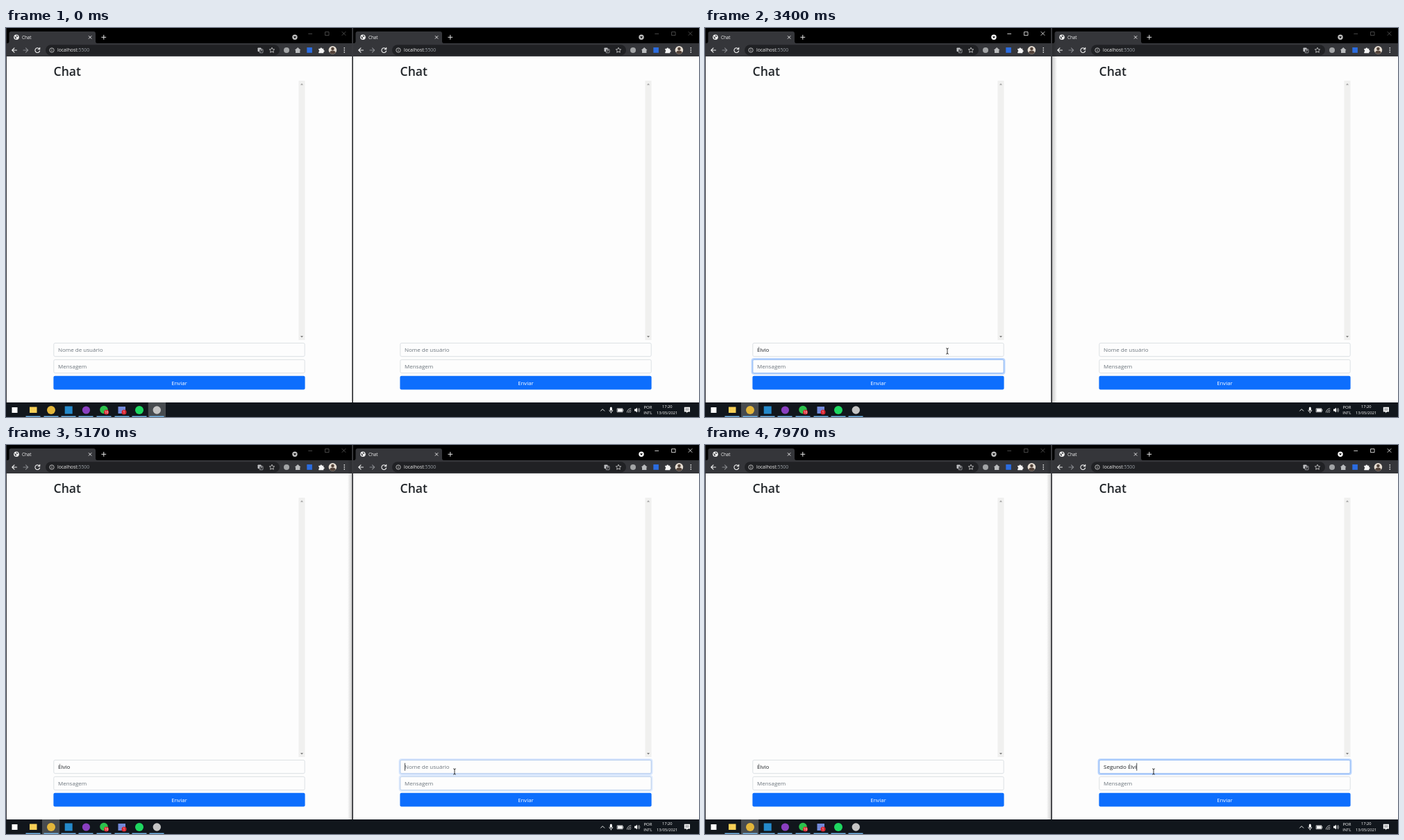
These frames come from a looping animation (998 by 561 pixels, 8 s). An HTML page:

```html
<!DOCTYPE html>
<html lang="pt-BR">
<head>
<meta charset="utf-8">
<title>Chat</title>
<style>
  html, body { margin: 0; width: 100%; height: 100%; overflow: hidden; background: #fdfdfd; }
  svg { display: block; width: 100vw; height: 100vh; }
  text { font-family: "Open Sans", "Noto Sans", sans-serif; white-space: pre; }
  .line { fill: none; stroke-linecap: round; stroke-linejoin: round; }
</style>
</head>
<body>
<svg id="stage" viewBox="0 0 998 561" preserveAspectRatio="none"></svg>
<script>
const LOOP = 8000, FADE = 150, BLINK = 500;
const stage = document.getElementById('stage');
const $ = id => document.getElementById(id);

const rect = (x, y, w, h, fill, extra = '') =>
  `<rect x="${x}" y="${y}" width="${w}" height="${h}" fill="${fill}" ${extra}/>`;
const circle = (x, y, r, fill, extra = '') =>
  `<circle cx="${x}" cy="${y}" r="${r}" fill="${fill}" ${extra}/>`;
const line = (d, color, width = 1, extra = '') =>
  `<path class="line" d="${d}" stroke="${color}" stroke-width="${width}" ${extra}/>`;
const shape = (d, fill, extra = '') => `<path d="${d}" fill="${fill}" ${extra}/>`;
const text = (x, y, size, fill, str, extra = '') =>
  `<text x="${x}" y="${y}" font-size="${size}" fill="${fill}" ${extra}>${str}</text>`;
const middle = 'text-anchor="middle"';

// A text field with placeholder, typed value, caret and fading focus ring
function field(id, y, placeholder) {
  return rect(68.8, y, 361.4, 19.3, '#fdfdfd', 'rx="2" stroke="#ced4da" stroke-width=".7"') +
    `<g id="${id}-focus">` +
    rect(67.6, y - 1.2, 363.8, 21.7, 'none', 'rx="3" stroke="#0d6efd" stroke-opacity=".28" stroke-width="2"') +
    rect(68.8, y, 361.4, 19.3, 'none', 'rx="2" stroke="#86b7fe" stroke-width=".8"') + '</g>' +
    text(75, y + 12.6, 8, '#6c757d', placeholder, `id="${id}-hint"`) +
    text(75, y + 12.6, 8, '#212529', '', `id="${id}-value"`) +
    rect(75, y + 4.3, .8, 11, '#212529', `id="${id}-caret"`);
}

function toolbar() {
  return rect(0, 22, 499, 19, '#35363a') +
    line('M15.5 32H9M12 28.8 8.8 32 12 35.2', '#f1f1f1', 1.1) +
    line('M25 32h6.5M28.5 28.8 31.7 32 28.5 35.2', '#85878b', 1.1) +
    line('M47.6 29.6A3.4 3.4 0 1 0 48.6 33M48.7 28.3V30.7H46.2', '#f1f1f1', 1.1) +
    rect(57, 24.2, 337, 15.4, '#202124', 'rx="7.7"') +
    circle(66, 32, 3.2, 'none', 'stroke="#d8d8d8" stroke-width=".8"') +
    line('M66 31.8v1.6M66 30.2v.1', '#d8d8d8', .8) +
    text(74, 34.4, 6.85, '#f1f1f1', 'localhost<tspan fill="#9aa0a6">:5500</tspan>') +
    rect(362.5, 28.5, 5, 5.5, '#bfc1c4', 'rx=".7"') +
    rect(365, 30.5, 5, 5.3, '#202124', 'rx=".7" stroke="#bfc1c4" stroke-width=".7"') +
    line('M366.3 32h2.4M367.5 31.5v.5M366.5 34.5l2-2.4', '#bfc1c4', .6) +
    shape('M383 28.2l1.1 2.4 2.6.3-1.9 1.8.5 2.6-2.3-1.3-2.3 1.3.5-2.6-1.9-1.8 2.6-.3z', 'none',
      'stroke="#d8d8d8" stroke-width=".8"') +
    circle(404, 32, 4, '#a2a4a6') +
    shape('M415.8 32l4.4-4 4.4 4h-1.2v4h-6.4v-4z', '#b9bbbd') +
    rect(433.3, 28, 7.6, 7.8, '#2b6ce0') +
    shape('M450.3 29.7h2.2a1.3 1.3 0 0 1 2.6 0h2.2v2.2a1.3 1.3 0 0 1 0 2.6v1.8h-7v-2a1.3 1.3 0 0 0 0-2.5z', '#f4f4f4') +
    circle(470.4, 31.8, 5.8, '#e6ddd2') +
    circle(470.4, 30, 2.3, '#54443b') + shape('M466 35.5a4.5 3.8 0 0 1 8.8 0 5.8 5.8 0 0 1-8.8 0z', '#54443b') +
    [28.8, 31.8, 34.8].map(y => circle(487.3, y, .85, '#f1f1f1')).join('');
}

function browser(id, x) {
  return `<g transform="translate(${x})">` +
    rect(0, 0, 499, 540, '#fdfdfd') + rect(0, 0, 499, 22, '#000') +
    shape('M2 22Q4.5 22 4.5 19V8Q4.5 5 7.5 5H126Q129 5 129 8V19Q129 22 131.5 22Z', '#35363a') +
    circle(15, 13.3, 3.8, '#f1f1f1') +
    shape('M12 12l2.6 1 .3 2.4-1.2.6zM15 10.2l2.6 1.6-1.4 1.3-1.4-.8z', '#45464a') +
    text(23, 15.6, 6.3, '#f1f1f1', 'Chat') +
    line('M119.2 11.5l3.8 3.8M123 11.5l-3.8 3.8', '#f1f1f1', .9) +
    line('M137.8 13.3h6M140.8 10.3v6', '#e8e8e8', 1) +
    circle(416, 13.3, 3.7, '#eee', `id="${id}-badge"`) + shape('M414 12.3h4l-2 2.6z', '#000') +
    `<g id="${id}-controls" stroke="#fff">` +
    '<path class="line" stroke-width=".8" d="M435.7 8.4h5M460 5.7h5v5h-5zM484 5.5l5 5M489 5.5l-5 5"/></g>' +
    toolbar() +
    text(68.5, 68.7, 17.6, '#212529', 'Chat', 'font-weight="600"') +
    rect(421.5, 76, 9, 374, '#f0f0ef') +
    shape('M424 82.2h4l-2-2.4z', '#a3a3a3') + shape('M424 444h4l-2 2.4z', '#808080') +
    field(id + '-name', 454.4, 'Nome de usuário') +
    field(id + '-message', 478.3, 'Mensagem') +
    rect(68.4, 501.7, 362.2, 19.8, '#0d6efd', 'rx="2.1"') +
    `<g id="${id}-send-focus">` +
    rect(68.4, 501.7, 362.2, 19.8, '#0b5ed7', 'rx="2.1"') +
    rect(67.4, 500.7, 364.2, 21.8, 'none', 'rx="3" stroke="#3184fd" stroke-opacity=".5" stroke-width="2"') + '</g>' +
    text(249.5, 514.6, 7.8, '#fff', 'Enviar', middle) +
    rect(0, 0, 1, 540, '#33343a') + '</g>';
}

function taskbar() {
  const running = [39, 65, 90, 115, 141, 167, 192, 217];
  const badge = (x, label) => circle(x, 554, 3.5, '#d9232e') + text(x, 556, 5, '#fff', label, middle);
  return rect(0, 540, 998, 21, '#11161c') +
    rect(204.8, 540, 25.2, 21, '#474b4f', 'id="recorder-active"') +
    rect(52, 540, 25.2, 21, '#474b4f', 'id="browser-active"') +
    running.map(x => rect(x - 10.5, 559.6, 21, 1.4, '#76b9ed')).join('') +
    rect(8.5, 547, 8, 8, '#fff') + rect(34, 546.5, 10.5, 8.5, '#f8cf57') +
    circle(65, 551, 6, '#e2b53a') + rect(84.7, 545.5, 11, 11, '#2489ca') +
    circle(115.4, 551, 5.6, '#8a3fc0') + circle(141, 550.5, 5.8, '#2cc14c') + badge(144.5, '16') +
    rect(161.5, 546, 10.5, 10, '#7289da') + badge(170, '1') +
    circle(192, 551, 6, '#1ed760') + circle(217.3, 551, 5.7, '#c4c4c4') +
    line('M856.6 552.2l2.6-2.6 2.6 2.6', '#fff', .9) +
    rect(869.8, 546.5, 3, 5.5, '#fff', 'rx="1.5"') + line('M868.8 551.2a2.5 2.5 0 0 0 5 0M871.3 553.7v1.5', '#fff', .8) +
    rect(881, 549.3, 6.5, 4, '#fff') + line('M880.5 548.8h7.5v5h-7.5zM888.7 550.4v1.8', '#fff', .7) +
    line('M894.4 554.2a5.5 5.5 0 0 1 5.5-5.5M896.4 554.5a3.5 3.5 0 0 1 3.5-3.5M898.5 554.5a1.4 1.4 0 0 1 1.4-1.4', '#ddd', .8) +
    shape('M905 549.6h1.7l2.2-2v7l-2.2-2H905z', '#fff') +
    line('M910.3 549.6q1.1 1.5 0 3M911.7 548.3q2.1 2.8 0 5.6', '#fff', .7) +
    text(924.4, 548.6, 6, '#fff', 'POR', middle) + text(924.4, 557.2, 5.8, '#fff', 'INTL', middle) +
    text(952.2, 548.3, 5.7, '#fff', '17:20', middle) + text(952.2, 557.2, 5.7, '#fff', '13/05/2021', middle) +
    shape('M976.8 546.8h8.2v6.6h-3.2l-1.7 2v-2h-3.3z', '#fff') +
    line('M978.5 549h4.8M978.5 551h4.8', '#11161c', .6);
}

const pointers = {
  beam: line('M-1.4-4.2Q0-4.2 0-3V3Q0 4.2-1.4 4.2M1.4-4.2Q0-4.2 0-3M0 3Q0 4.2 1.4 4.2', '#222', .9),
  resize: line('M-5 0H5M-3-2-5.2 0-3 2M3-2 5.2 0 3 2M-.6-2.2v4.4M.6-2.2v4.4', '#333', .8),
  arrow: shape('M0 0V9.2L2.2 7.2 3.7 10.5 5.2 9.8 3.7 6.6H6.6Z', '#fff', 'stroke="#000" stroke-width=".6"')
};

stage.innerHTML =
  `<defs><linearGradient id="shade"><stop stop-color="#000" stop-opacity=".2"/>
   <stop offset="1" stop-color="#000" stop-opacity="0"/></linearGradient></defs>` +
  browser('left', 0) + browser('right', 499) +
  rect(500, 0, 7, 540, 'url(#shade)', 'id="left-shadow"') +
  rect(-499, 0, 7, 540, 'url(#shade)', 'id="right-shadow" transform="scale(-1 1)"') +
  rect(498.2, 0, 1.6, 540, '#3b3c40') + taskbar() +
  Object.entries(pointers).map(([name, art]) => `<g id="${name}">${art}</g>`).join('');

// Focus spans [from, to] and key press times, in ms
const windows = { left: [750, 4550], right: [4550, Infinity] };
const inputs = [
  { id: 'left-name', span: [750, 2670], value: 'Élvio', keys: [1900, 2080, 2230, 2380, 2510] },
  { id: 'left-message', span: [2670, 3500], value: '', keys: [] },
  { id: 'left-send', span: [3500, 4550] },
  { id: 'right-name', span: [5090, Infinity], value: 'Segundo Élvi',
    keys: [5980, 6200, 6380, 6560, 6720, 6800, 6930, 7060, 7310, 7560, 7760, 7940] },
  { id: 'right-message', span: [4550, 5090], value: '', keys: [] },
  { id: 'right-send', span: [Infinity, Infinity] }
];
const pointerPath = [
  [60, 998, 330], [700, 349, 466], [3700, 349, 466], [4130, 501, 460],
  [4480, 640, 488], [4850, 640, 488], [5060, 646, 471]
];

const within = (t, [from, to]) => t >= from && t < to;
const clamp = v => Math.max(0, Math.min(1, v));
const ease = k => k * k * (3 - 2 * k);
const show = (id, on) => $(id).setAttribute('visibility', on ? 'visible' : 'hidden');

function pointerAt(t) {
  const next = pointerPath.findIndex(p => p[0] > t);
  if (next < 0) return pointerPath.at(-1).slice(1);
  const [t0, x0, y0] = pointerPath[next - 1], [t1, x1, y1] = pointerPath[next];
  const k = ease((t - t0) / (t1 - t0));
  return [x0 + (x1 - x0) * k, y0 + (y1 - y0) * k];
}

function pointerKind(x, y) {
  if (Math.abs(x - 500) < 4) return 'resize';
  const inField = (y > 454 && y < 474) || (y > 478 && y < 498);
  return inField && x % 499 > 68 && x % 499 < 431 ? 'beam' : 'arrow';
}

function drawInput({ id, span, value, keys }, t) {
  const level = clamp((t - span[0]) / FADE) - clamp((t - span[1]) / FADE);
  $(id + '-focus').setAttribute('opacity', ease(level));
  if (!keys) return;
  const pressed = keys.filter(k => k <= t);
  const typed = value.slice(0, pressed.length);
  const label = $(id + '-value');
  if (label.textContent !== typed) label.textContent = typed;
  show(id + '-hint', !typed);
  const since = t - (pressed.at(-1) ?? span[0]);
  show(id + '-caret', within(t, span) && Math.floor(since / BLINK) % 2 === 0);
  $(id + '-caret').setAttribute('x', 75 + (typed ? label.getComputedTextLength() : 0));
}

function draw(t) {
  for (const [id, span] of Object.entries(windows)) {
    const active = within(t, span);
    $(id + '-controls').firstChild.setAttribute('stroke', active ? '#fff' : '#5c5c5c');
    $(id + '-badge').setAttribute('fill', active ? '#fff' : '#bdbdbd');
    show(id + '-shadow', active);
  }
  show('recorder-active', t < 750);
  show('browser-active', within(t, windows.left) && t < 3400 ? true : t >= 750);
  inputs.forEach(input => drawInput(input, t));

  const visible = t >= pointerPath[0][0];
  const [x, y] = visible ? pointerAt(t) : [0, 0];
  const kind = pointerKind(x, y);
  for (const name in pointers) {
    show(name, visible && name === kind);
    $(name).setAttribute('transform', `translate(${x} ${y})`);
  }
}

const start = performance.now();
function tick() {
  draw((performance.now() - start) % LOOP);
  requestAnimationFrame(tick);
}
tick();
</script>
</body>
</html>
```
